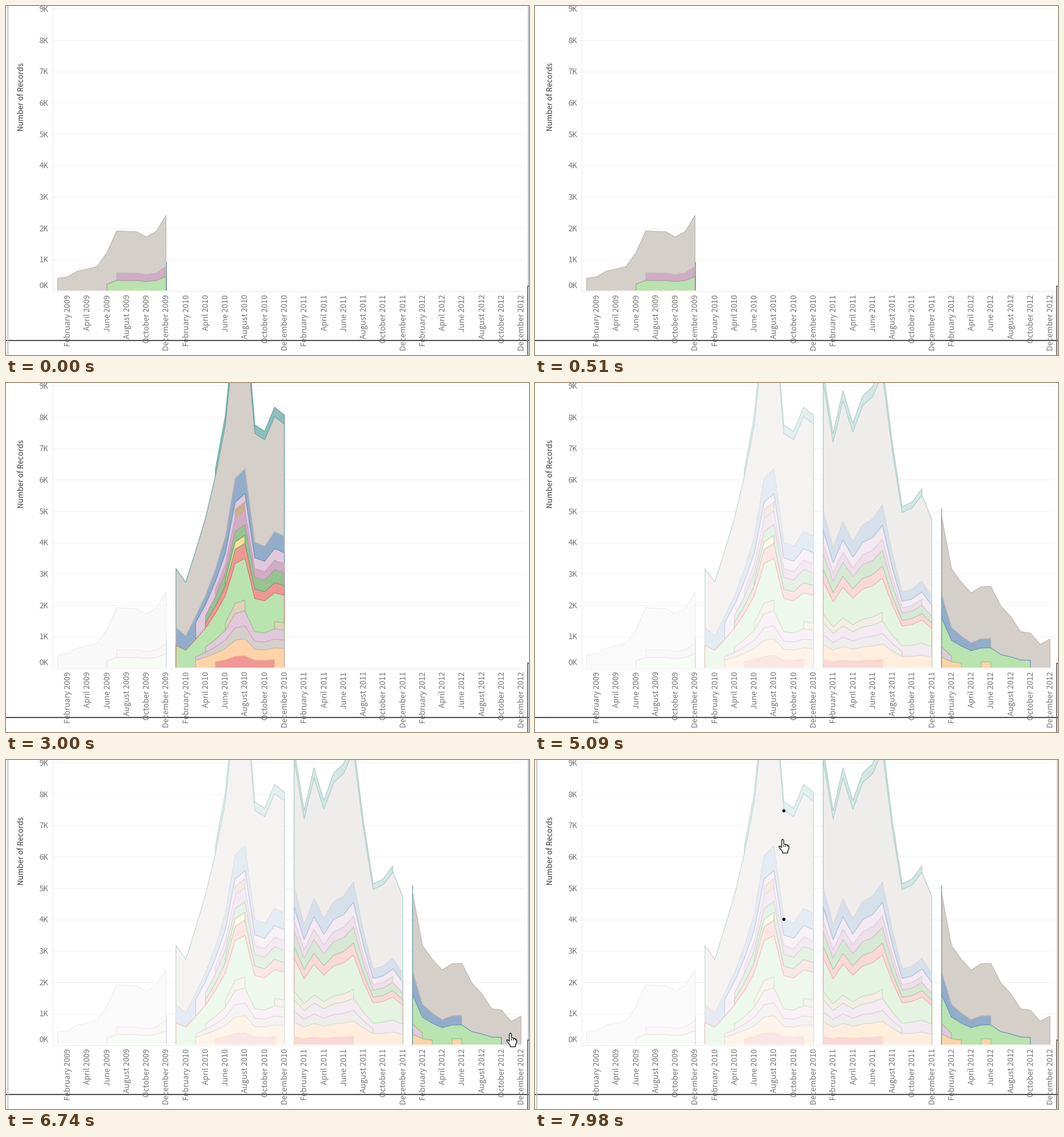
Write a matplotlib script that moves like this. It is 829 by 553 pixels and loops after 8 s.

```python
import numpy as np
import matplotlib.pyplot as plt
from matplotlib.animation import FuncAnimation
from matplotlib.collections import LineCollection, PolyCollection
from matplotlib.colors import to_rgb
from matplotlib.patches import Rectangle

W, H, DPI = 829, 553, 64
PX = 72 / DPI            # one pixel in points
STEP, LOOP = 20, 8000    # ms
BASE, PER_K = 451, 49.67  # y of zero, pixels per thousand records

plt.rcParams["font.family"] = "Noto Sans CJK JP"

# fill, edge
PALETTE = {
    "grey": ("#d5cfca", "#beb7b2"), "teal": ("#8fbfba", "#68a59f"),
    "blue": ("#92adca", "#6d90b8"), "lilac": ("#e2c8dd", "#c6a3c3"),
    "tan": ("#cbb086", "#c09a5f"), "mauve": ("#cfadc4", "#b394a8"),
    "green": ("#97c391", "#6ca368"), "yellow": ("#f8df9a", "#e6c75f"),
    "red": ("#ee9896", "#dd7573"), "lime": ("#b9e3af", "#94c588"),
    "sand": ("#e3cebc", "#cdb196"), "orange": ("#fed3a9", "#f2bd85"),
    "steel": ("#6598a8", "#6598a8"),
}

# Monthly records in tens; the main block of categories follows the total
total = np.array([
    40, 44, 62, 69, 77, 121, 191, 189, 188, 171, 189, 240,
    316, 272, 372, 477, 610, 773, 1069, 1119, 747, 727, 801, 777,
    908, 719, 852, 751, 836, 864, 936, 691, 495, 509, 550, 473,
    483, 316, 272, 238, 258, 259, 197, 163, 115, 110, 74, 91]) / 100 * PER_K
core = np.maximum(.63 * total - 35, .31 * total)

# Top to bottom: colour, series, share of it, first and last month
BANDS = [
    ("teal", total, 1.037, 16, 34),
    ("grey", total, 1, 0, 47),
    ("blue", core, 1, 12, 41),
    ("lilac", core, .875, 14, 35),
    ("tan", core, .835, 18, 19),
    ("mauve", core, .96, 6, 11),
    ("mauve", core, .79, 16, 34),
    ("green", core, .72, 15, 35),
    ("yellow", core, .665, 17, 19),
    ("red", core, .625, 15, 35),
    ("lime", core, .55, 5, 35),
    ("lime", core, .68, 36, 45),
    ("sand", core, .34, 17, 19),
    ("sand", core, .34, 22, 30),
    ("lilac", core, .285, 15, 37),
    ("grey", core, .21, 14, 32),
    ("orange", core, .145, 14, 38),
    ("orange", core, .2, 40, 41),
    ("red", core, .06, 16, 22),
    ("red", core, .05, 24, 30),
    ("blue", total, .385, 11, 11),
    ("steel", total, 1.055, 36, 36),
]
STARTS = [0, 3000, 4160, 5090]
# Strength of each year's colours once a later year is selected
STRENGTH = [[1], [.12, 1], [.12, .33, 1], [.1, .24, .38, 1]]


def month_x(i):
    return 81.8 + 15.63 * i


def outline(heights, first, last):
    i = np.arange(first, last + 1)
    foot = BASE + 5      # below the clip, so no line shows along the base
    return [(month_x(first), foot), *zip(month_x(i), BASE - heights[i]),
            (month_x(last), foot)]


def year_bands(year):
    """Outlines, fills and edges; a band's edge comes from the one above it."""
    shapes, fills, edges, placed = [], [], [], []
    for color, series, share, first, last in BANDS:
        a, b = max(first, 12 * year), min(last, 12 * year + 11)
        if a > b:
            continue
        mid = a + .55 * (b - a)
        above = [c for c, lo, hi in placed if a < b and lo <= mid <= hi]
        shapes.append(outline(series * share, a, b))
        fills.append(PALETTE[color][0])
        edges.append(PALETTE[above[-1] if above else color][1])
        placed.append((color, a, b))
    return shapes, fills, edges


def tint(colors, k):
    return [tuple(1 - k * (1 - c) for c in to_rgb(color)) for color in colors]


fig = plt.figure(figsize=(W / DPI, H / DPI), dpi=DPI, facecolor="white")
ax = fig.add_axes([0, 0, 1, 1])
ax.set(xlim=(0, W), ylim=(H, 0))
ax.axis("off")


def rules(segments, color, width, z):
    lines = LineCollection(segments, colors=color, linewidths=width * PX, zorder=z)
    return ax.add_collection(lines)


def label(x, y, text, size, color, **kw):
    ax.text(x, y, text, fontsize=size * PX, color=color, va="baseline",
            rotation_mode="anchor", zorder=4, **kw)


# Grid and axis labels
levels = [BASE + .5 - PER_K * k for k in range(10)]
rules([[(70, y), (824, y)] for y in levels[1:]], "#f1f1f1", 1, 0)
rules([[(74, BASE + .5), (824, BASE + .5)], [(74.5, 0), (74.5, BASE)]], "#ececec", 1, 0)
for k, y in enumerate(levels):
    label(67.5, (y if k else 442.5) + 4.5, f"{k}K", 12.2, "#747474", ha="right")
names = ["February", "April", "June", "August", "October", "December"]
for i in range(24):
    label(month_x(2 * i + 1) + 4.7, 457, f"{names[i % 6]} {2009 + i // 6}",
          12.3, "#747474", ha="right", rotation=90)
label(28, 143.5, "Number of Records", 12, "#3f3a36", ha="center", rotation=90)

# Areas
years = []
for y in range(4):
    shapes, fills, edges = year_bands(y)
    polys = ax.add_collection(PolyCollection(shapes, linewidths=1.1 * PX, zorder=2))
    polys.set_clip_path(Rectangle((0, 0), W, BASE, transform=ax.transData))
    years.append((polys, fills, edges))

# Window lines
rules([[(0, 530), (W, 530)]], "#5a5a5a", 2, 5)
rules([[(0, 552.5), (W, 552.5)]], "#c4c4c4", 1, 5)
rules([[(827.2, 443), (827.2, H)], [(826, 443.5), (W, 443.5)]], "#7c7c80", 2, 5)
border = rules([[(3, 0), (3, H)], [(828.5, 0), (828.5, 443)]], "#bdbdbd", 1.6, 5)

# Hover dots and hand cursor
dots, = ax.plot([], [], "o", color="black", ms=5 * PX, mew=0, zorder=6)
HAND = np.array([
    (6.5, .6), (8.2, 2), (8.2, 8), (11, 8.6), (13.8, 9.7), (16.5, 11.4),
    (16.5, 15.5), (14.6, 19), (14.6, 22.4), (6.2, 22.4), (6.2, 20),
    (.6, 12.8), (1, 11.4), (2.8, 11.6), (5, 13.8), (5, 2)])
KNUCKLES = np.array([[(x, 8.6), (x, 12)] for x in (8.2, 11, 13.8)])
hand, = ax.fill(*HAND.T, fc="white", ec="black", lw=1.1 * PX, zorder=7)
knuckles = rules(KNUCKLES, "black", 1, 8)

ENTER, REST, LEAVE, LAST = 6740, 7520, 7900, 7980
FROM, VIA, TO = np.array([(793, 432), (437, 163), (386, 125)])


def cursor_at(t):
    if t >= LAST:
        return TO
    if t >= LEAVE:
        return VIA + .45 * (TO - VIA)
    u = min((t - ENTER) // 78, 10) / 10
    return FROM + (VIA - FROM) * u * u * (3 - 2 * u)


def border_alpha(t):
    if t < 360 or t >= ENTER:
        return 1
    return .65 if t < 430 else .3 if t < 510 else 0


def draw(n):
    t = n * STEP + STEP / 2
    stage = sum(t >= s for s in STARTS) - 1
    for y, (polys, fills, edges) in enumerate(years):
        polys.set_visible(y <= stage)
        if y <= stage:
            k = STRENGTH[stage][y]
            polys.set_facecolor(tint(fills, k))
            polys.set_edgecolor(tint(edges, k ** .6))

    border.set_alpha(border_alpha(t))
    inside = t >= ENTER
    hand.set_visible(inside)
    knuckles.set_visible(inside)
    dots.set_visible(t >= REST)
    if inside:
        pos = cursor_at(t)
        hand.set_xy(HAND + pos)
        knuckles.set_segments(KNUCKLES + pos)
        # Mark the band under the pointer at the nearest month
        i = min(round((pos[0] + 6.5 - month_x(0)) / 15.63), 47)
        dots.set_data([month_x(i)] * 2, [BASE - total[i], BASE - core[i]])
    return [*(polys for polys, _, _ in years), border, hand, knuckles, dots]


anim = FuncAnimation(fig, draw, frames=LOOP // STEP, interval=STEP,
                     repeat=True, repeat_delay=0, blit=False)
plt.show()
```
